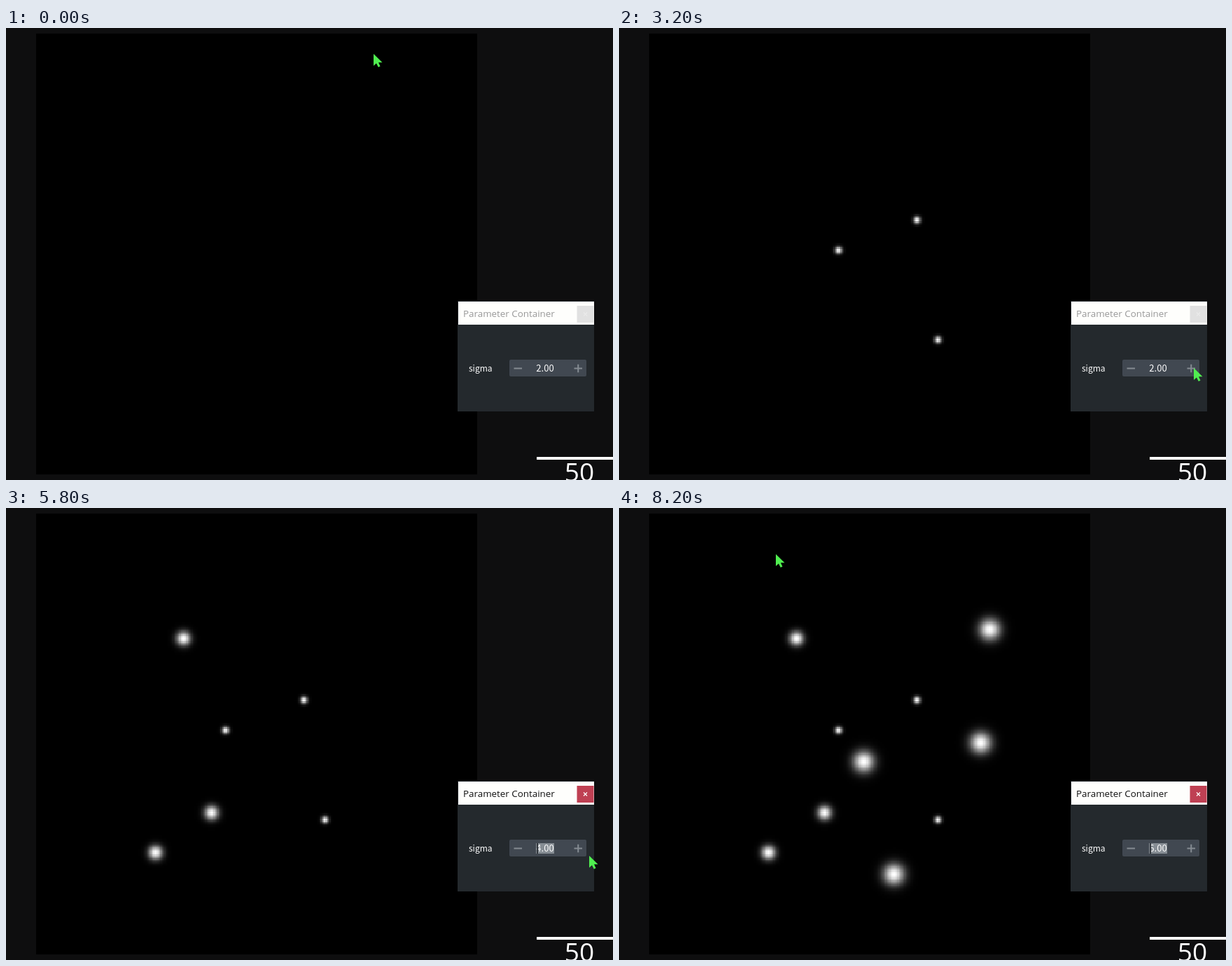
An HTML page with a canvas for the animation above (8.4 s loop, 867x646 px).

```html
<!DOCTYPE html>
<html lang="en">
<head>
<meta charset="utf-8">
<title>Gaussian spots</title>
<style>
html, body { margin: 0; width: 100%; height: 100%; overflow: hidden; background: #0e0e0f; }
canvas { position: absolute; left: 43px; top: 8px; width: 630px; height: 630px; image-rendering: pixelated; background: #000; }
svg { position: absolute; left: 0; top: 0; }
.ui { font-family: "Noto Sans CJK JP", "Noto Sans", sans-serif; fill: #fff; }
.seg { font-family: "Open Sans", "Noto Sans", sans-serif; }
</style>
</head>
<body>
<canvas id="image" width="256" height="256"></canvas>
<svg width="867" height="646" viewBox="0 0 867 646">
  <rect x="758" y="613" width="109" height="4" fill="#fff"/>
  <text class="seg" x="819" y="648" font-size="37" text-anchor="middle" fill="#fff">50</text>

  <rect x="645" y="390" width="195" height="158" fill="#24292d"/>
  <rect x="646" y="391" width="194" height="33" fill="#fefefc"/>
  <text id="title" class="seg" x="653" y="413" font-size="13.4">Parameter Container</text>
  <rect id="close" x="815.5" y="397" width="24" height="24"/>
  <path id="cross" d="M825 406.500l5 5m0-5l-5 5" stroke="#fff" stroke-width="1.2"/>

  <text class="ui" x="661" y="491" font-size="12">sigma</text>
  <rect x="719" y="474" width="110" height="24" rx="2" fill="#414851"/>
  <path d="M725.500 486.500h11.500M811.500 486.500h11.500M817.250 480.750v11.500" stroke="#858b92" stroke-width="2"/>
  <rect id="selection" x="757" y="479" width="26" height="15" fill="#868d94"/>
  <text id="value" class="ui" x="770" y="491" font-size="13" text-anchor="middle"></text>
  <rect id="caret" x="758" y="479" width="2" height="15" fill="#30353b"/>

  <path id="cursor" d="M0 0V17L4 13.500L6.800 19L9.500 17.800L7 12.300H12.500Z" fill="#50ee50"/>
</svg>
<script>
const STEP = 200, STEPS = 42, CELL = 630 / 256;

// How many steps the pointer rests after each kind of action
const REST = { pass: 0, spot: 1, click: 2 };

// Arrival step, pointer position, action there
const stops = [
  [0, 525, 37, "pass"], [5, 324, 332, "pass"],
  [6, 315, 320, "spot"], [9, 427, 277, "spot"], [12, 457, 448, "spot"],
  [16, 821, 486, "pass"], [17, 821, 486, "click"],
  [21, 215, 495, "spot"], [23, 295, 438, "spot"], [25, 255, 189, "spot"],
  [28, 849, 501, "pass"], [29, 833, 497, "pass"], [31, 818, 486, "click"],
  [35, 531, 176, "spot"], [37, 518, 338, "spot"], [38, 394, 526, "spot"],
  [39, 351, 365, "spot"], [41, 224, 66, "pass"]
];

const $ = id => document.getElementById(id);
const ctx = $("image").getContext("2d");
const clamp = (v, low, high) => Math.min(high, Math.max(low, v));
const ease = k => k * k * (3 - 2 * k);
const show = (id, on) => $(id).setAttribute("visibility", on ? "visible" : "hidden");

function pointer(step) {
  const i = stops.findLastIndex(s => s[0] <= step);
  const [from, ax, ay, action] = stops[i];
  const [to, bx, by] = stops[i + 1] || [STEPS, ax, ay];
  const leave = Math.min(from + REST[action], to - 1);
  const k = ease(clamp((step - leave) / (to - leave), 0, 1));
  return [ax + (bx - ax) * k, ay + (by - ay) * k];
}

// The hot spot lies just up and left of the visible pointer tip
function drawSpot(x, y, sigma) {
  const cx = (x - 1.4 - 43) / CELL, cy = (y - 2.5 - 8) / CELL, r = Math.ceil(sigma * 2.5);
  for (let j = Math.floor(cy) - r; j <= cy + r; j++)
    for (let i = Math.floor(cx) - r; i <= cx + r; i++) {
      const d = (i + .5 - cx) ** 2 + (j + .5 - cy) ** 2;
      const g = Math.round(255 * Math.exp(-d / sigma ** 2));
      ctx.fillStyle = `rgb(${g},${g},${g})`;
      if (g > 0) ctx.fillRect(i, j, 1, 1);
    }
}

function render(step) {
  let sigma = 2;
  ctx.clearRect(0, 0, 256, 256);
  for (const [at, x, y, action] of stops) {
    if (action === "click") sigma += clamp(step - at, 0, 2);
    if (action === "spot" && step > at) drawSpot(x, y, sigma);
  }

  const active = sigma > 2;
  $("title").setAttribute("fill", active ? "#111" : "#999");
  $("close").setAttribute("fill", active ? "#bf4053" : "#e1e1e1");
  $("cross").setAttribute("opacity", active ? 1 : .3);
  $("value").textContent = sigma.toFixed(2);
  show("selection", active);
  show("caret", active && Math.floor(step / 6) % 2 === 0);
  $("cursor").setAttribute("transform", `translate(${pointer(step)})`);
}

const start = performance.now();
let last = -1;
function tick() {
  const step = Math.floor((performance.now() - start) / STEP) % STEPS;
  if (step !== last) render(last = step);
  requestAnimationFrame(tick);
}
tick();
</script>
</body>
</html>
```
